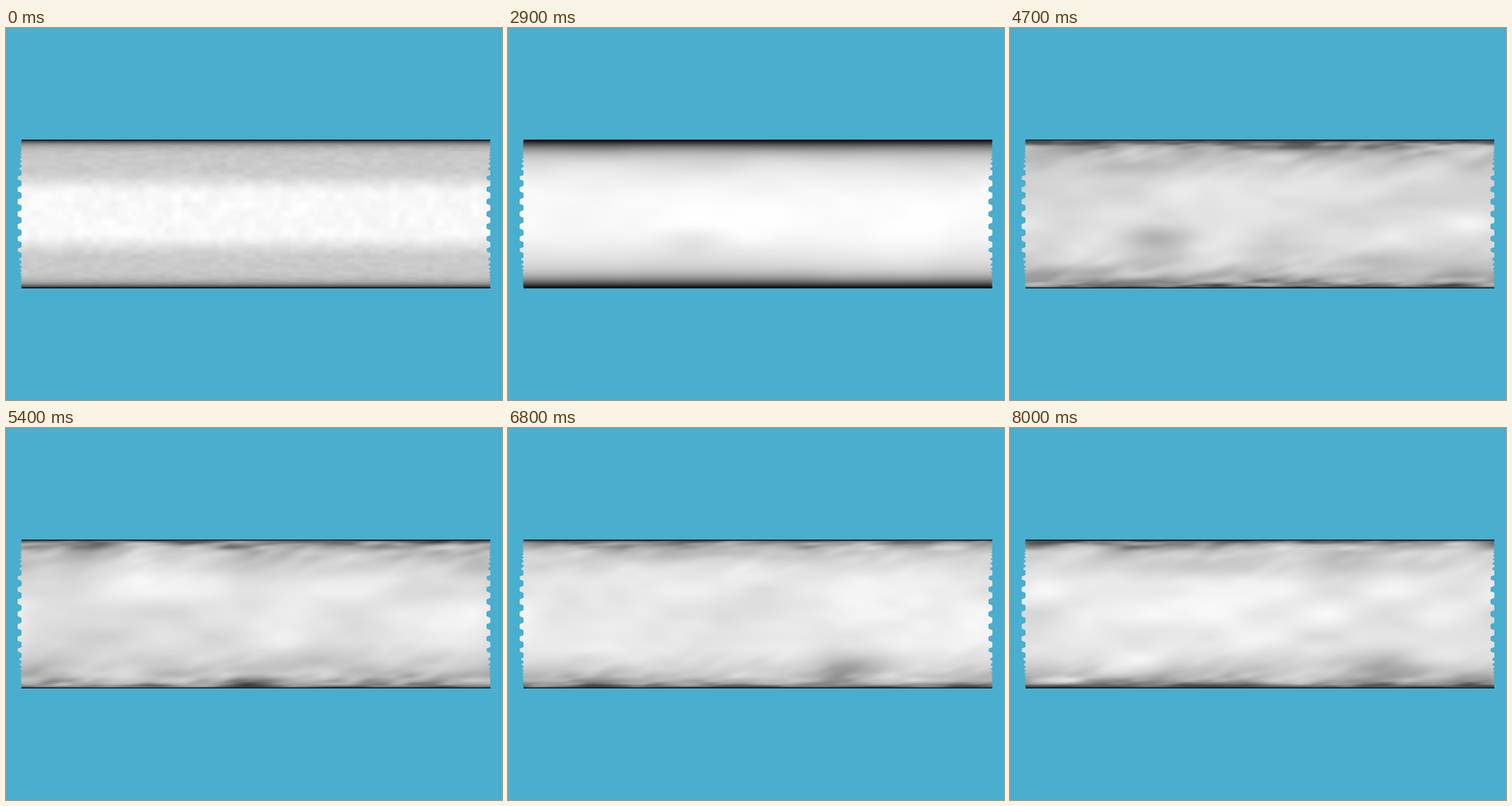
Recreate the animation shown at these times as an HTML page with a canvas. Size 640 by 480 pixels, loop 8100 ms.

```html
<!DOCTYPE html>
<html lang="en">
<head>
<meta charset="utf-8">
<title>Channel flow</title>
<style>
html, body { margin: 0; width: 100%; height: 100%; overflow: hidden; background: #4aaece; }
canvas { display: block; }
</style>
</head>
<body>
<canvas id="stage" width="640" height="480"></canvas>
<script>
const STEP = 100, STEPS = 81, PERIOD = 605, DRIFT = -0.1;
const LEFT = 15, TOP = 144, HALF = 96, COLS = 305, ROWS = 192;
const ctx = document.getElementById('stage').getContext('2d');
const fieldCanvas = document.createElement('canvas');
fieldCanvas.width = COLS;
fieldCanvas.height = ROWS;
const fieldCtx = fieldCanvas.getContext('2d');
const image = fieldCtx.createImageData(COLS, ROWS);

const mix = (a, b, p) => a + (b - a) * p;
const clamp = (v, lo, hi) => Math.min(hi, Math.max(lo, v));
const ramp = (v, from, to) => clamp((v - from) / (to - from), 0, 1);
const smooth = p => p * p * (3 - 2 * p);
const wrap = (v, n) => ((v % n) + n) % n;

// Brightness by distance d from the nearest wall
const rise = (d, size, power = 1) => 1 - Math.exp(-((d / size) ** power));
const banded = d => 203 * rise(d, 5) + 46 * smooth(ramp(d, 38, 72));
const rounded = d => 222 * rise(d, 12, 1.2) + 28 * smooth(ramp(d, 10, 80));
const turbulent = d => 30 + 165 * rise(d, 5) + 30 * smooth(ramp(d, 10, 60));

let seed = 41;
const random = () => (seed = (seed * 16807) % 2147483647) / 2147483647;
const lattice = Float32Array.from({ length: 4096 }, () => random() * 2 - 1);
const corner = (i, j, k) => lattice[(i * 73 + j * 1181 + k * 2671) & 4095];

// Value noise, periodic in x with the given number of cells
function noise(x, y, z, cells) {
  const u = wrap(x / PERIOD, 1) * cells;
  const i = Math.floor(u) % cells, j = Math.floor(y), k = Math.floor(z);
  const p = smooth(u - Math.floor(u)), q = smooth(y - j), r = smooth(z - k);
  const next = (i + 1) % cells;
  const layer = n => mix(
    mix(corner(i, j, n), corner(next, j, n), p),
    mix(corner(i, j + 1, n), corner(next, j + 1, n), p), q);
  return r ? mix(layer(k), layer(k + 1), r) : layer(k);
}

// The strongest eddies, each drifting through (x, y) at its peak time
const eddies = [
  { at: 2900, x: 240, y: 275, strength: -18 },
  { at: 3700, x: 330, y: 240, strength: 26 },
  { at: 3700, x: 390, y: 305, strength: -45 },
  { at: 4700, x: 190, y: 272, strength: -36 },
  { at: 4700, x: 590, y: 250, strength: 30 },
  { at: 6100, x: 515, y: 257, strength: 26 },
  { at: 6800, x: 440, y: 308, strength: -42 },
  { at: 8000, x: 500, y: 306, strength: -42 }
];

function eddyLight(x, y, time) {
  let sum = 0;
  for (const eddy of eddies) {
    const age = time - eddy.at;
    const dy = (y - eddy.y) / 17;
    if (Math.abs(age) > 800 || Math.abs(dy) > 3) continue;
    const dx = wrap(x - eddy.x - DRIFT * age + PERIOD / 2, PERIOD) - PERIOD / 2;
    sum += eddy.strength * (1 - smooth(Math.abs(age) / 800)) * Math.exp(-((dx / 45) ** 2) - dy * dy);
  }
  return sum;
}

function paintField(time) {
  const bend = ramp(time, 2600, 2900);
  const rough = ramp(time, 2900, 3700);
  const swell = 0.4 * bend + 0.6 * rough;
  const grain = 1 - ramp(time, 0, 200);
  const lift = rough * mix(-14, 8, ramp(time, 3700, 6100));

  for (let r = 0; r < ROWS; r++) {
    const y = TOP + r + 0.5, offset = y - 240;
    const d = HALF - Math.abs(offset);
    const inner = ramp(d, 0, 12);
    const near = Math.exp(-d / 22);
    const depth = Math.log(1 + d / 6) * 2 + (offset < 0 ? 0 : 40);
    const calm = mix(banded(d), rounded(d), bend);
    for (let c = 0; c < COLS; c++) {
      const x = LEFT + c * 2 + 1;
      let value = calm;
      if (bend) {
        const flow = x - DRIFT * time;
        const broad = noise(flow + offset * 0.4, offset / 30 + 20, time / 900, 8);
        const small = noise(flow - offset * 0.3, offset / 15 + 60, time / 700, 19);
        value = calm + inner * (swell * (broad * 16 + small * 5) + bend * eddyLight(x, y, time));
        if (rough) {
          const slant = flow + d * (offset < 0 ? 1.5 : -1.5);
          const streak = noise(slant, depth, time / 900, 10);
          const fine = noise(slant, depth * 1.5 + 90, time / 600, 28);
          const wall = d * Math.exp(near * (streak * 1.1 + fine * 0.4));
          value += rough * (turbulent(wall) - calm + inner * (lift + near * (streak * 20 + fine * 22)));
        }
      }
      if (grain) {
        const size = mix(5, 11, ramp(d, 0, 60));
        value += grain * inner * (5 * noise(x, offset / size + 50, 3, 52)
          + 2 * noise(x, offset / 6 + 90, 7, 95));
      }
      const o = (r * COLS + c) * 4;
      image.data[o] = image.data[o + 1] = image.data[o + 2] = clamp(value, 0, 254);
      image.data[o + 3] = 255;
    }
  }
  fieldCtx.putImageData(image, 0, 0);
}

// Interlocking cell edges, finer towards the walls
function cellEdges() {
  const half = [];
  for (let d = 0; d < 94;) {
    const size = d < 50 ? 16 - 4 * (d / 46) ** 3 : Math.max(1.6, (HALF - d) * 0.18);
    half.push([d, size]);
    d += size;
  }
  const rows = [...half.slice(1).reverse().map(([d, s]) => [-d, s]), ...half];
  return rows.flatMap(([d, size]) => {
    const y = 240 + d, x = 20 - Math.min(5, size * 0.4);
    return [[20, y - size * 0.32], [x, y - size * 0.17], [x, y + size * 0.17], [20, y + size * 0.32]];
  });
}
const edge = cellEdges();
const outline = new Path2D();
outline.moveTo(20, TOP);
edge.forEach(([x, y]) => outline.lineTo(x, y));
outline.lineTo(20, TOP + ROWS);
outline.lineTo(20 + PERIOD, TOP + ROWS);
[...edge].reverse().forEach(([x, y]) => outline.lineTo(x + PERIOD, y));
outline.lineTo(20 + PERIOD, TOP);
outline.closePath();

function draw(time) {
  paintField(time);
  ctx.fillStyle = '#4aaece';
  ctx.fillRect(0, 0, 640, 480);
  ctx.save();
  ctx.clip(outline);
  ctx.drawImage(fieldCanvas, LEFT, TOP, COLS * 2, ROWS);
  ctx.restore();
  ctx.fillStyle = '#0c1012';
  ctx.fillRect(20, TOP, PERIOD, 1);
  ctx.fillRect(20, TOP + ROWS - 1, PERIOD, 1);
}

const start = performance.now();
let shown = -1;
function tick() {
  const step = Math.floor((performance.now() - start) / STEP) % STEPS;
  if (step !== shown) {
    shown = step;
    draw(step * STEP);
  }
  requestAnimationFrame(tick);
}
tick();
</script>
</body>
</html>
```
